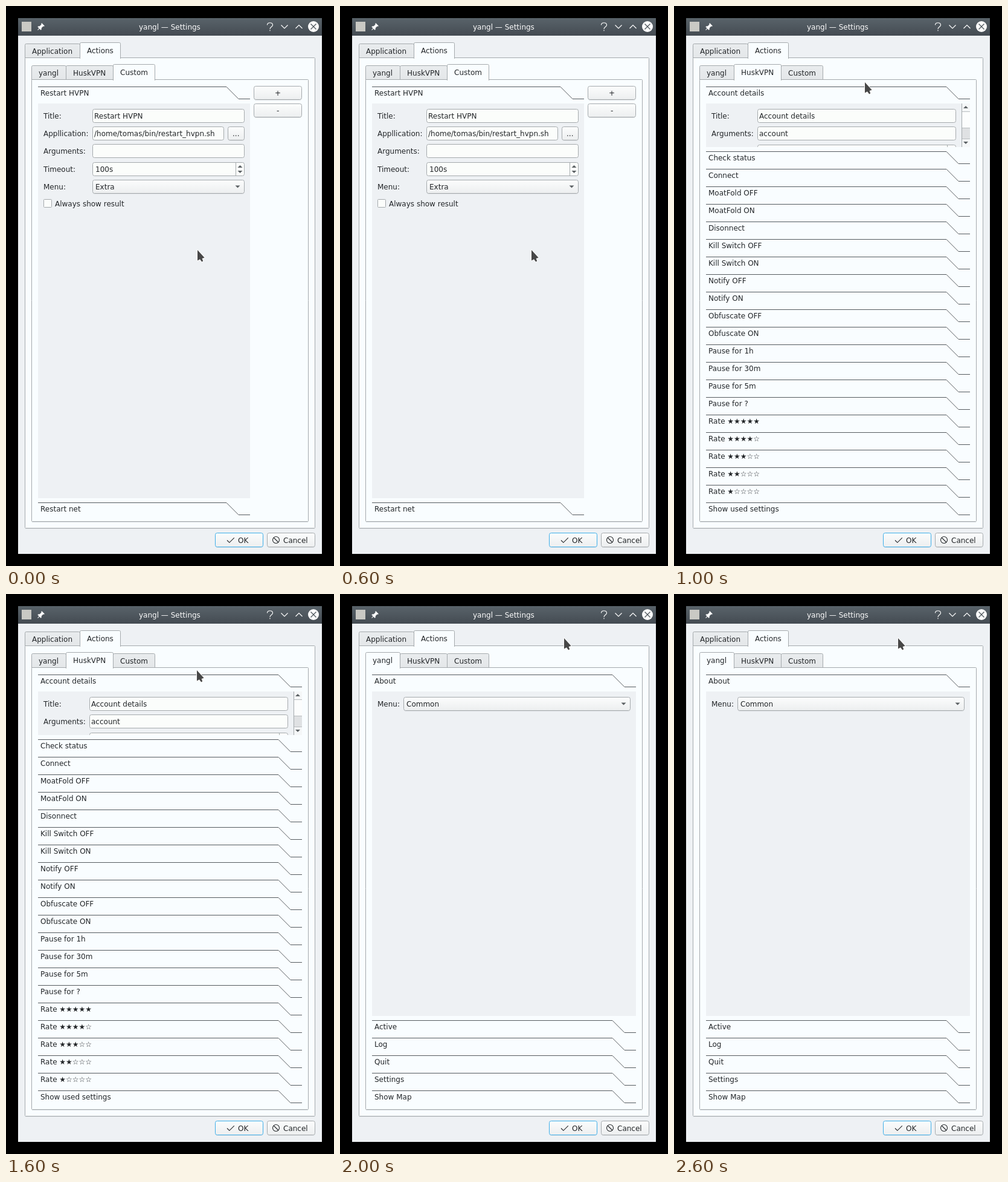
An HTML page with a canvas that plays this animation: 543 px wide and 925 px high, repeating every 3 s.

```html
<!DOCTYPE html>
<html lang="en">
<head>
<meta charset="utf-8">
<title>Settings</title>
<style>
  html, body { margin: 0; width: 100%; height: 100%; overflow: hidden; background: #000; }
  canvas { display: block; }
</style>
</head>
<body>
<canvas id="stage" width="543" height="925"></canvas>
<script>
const ctx = document.getElementById('stage').getContext('2d', { alpha: false });
const WINDOW = '#eef1f4', PANE = '#f9fdff', EDGE = '#a5aaad', INK = '#232629', FIELD = '#fbfdfb';
const TABS = [['yangl', 42, 57], ['HuskVPN', 99, 78], ['Custom', 177, 69]];

function rect(x, y, w, h, fill) {
  ctx.fillStyle = fill;
  ctx.fillRect(x, y, w, h);
}

function gradient(y, h, top, bottom) {
  const g = ctx.createLinearGradient(0, y, 0, y + h);
  g.addColorStop(0, top);
  g.addColorStop(1, bottom);
  return g;
}

function text(s, x, y, color = INK) {
  ctx.font = '12px "DejaVu Sans", sans-serif';
  ctx.fillStyle = color;
  ctx.fillText(s, x, y);
}

function stroke(path, color = INK, width = 1) {
  ctx.strokeStyle = color;
  ctx.lineWidth = width;
  ctx.stroke(new Path2D(path));
}

function fill(path, color) {
  ctx.fillStyle = color;
  ctx.fill(new Path2D(path));
}

function box(x, y, w, h, paint, radius = 3, edge = EDGE) {
  ctx.beginPath();
  ctx.roundRect(x + .5, y + .5, w - 1, h - 1, radius);
  ctx.fillStyle = paint;
  ctx.fill();
  ctx.strokeStyle = edge;
  ctx.lineWidth = 1;
  ctx.stroke();
}

function button(x, y, w, h, edge) {
  rect(x + 2, y + h, w - 4, 1, '#dfe2e5');
  box(x, y, w, h, gradient(y, h, '#fcfdfd', '#eceeef'), 3, edge);
}

function arrow(x, y, dir, size = 4) {
  fill(`M${x - size} ${y - dir * 2}h${size * 2}l${-size} ${dir * size}z`, '#5b6063');
}

function field(label, value, x, y, w) {
  text(label, 62, y + 16);
  box(x, y, w, 23, FIELD);
  text(value, x + 3, y + 16);
}

function combo(value, x, y, w) {
  text('Menu:', 62, y + 16);
  button(x, y, w, 23);
  text(value, x + 5, y + 16);
  arrow(x + w - 11.5, y + 11.5, 1);
}

function pane(x, y, w, h) {
  rect(x + 1, y + h, w - 2, 1, '#dde1e4');
  box(x, y, w, h, PANE, 1);
}

function tab(label, x, y, w, active) {
  const top = active ? y : y + 2, bottom = y + (active ? 27 : 26);
  const l = x + .5, r = x + w + .5, t = top + .5;
  const shape = `M${l} ${bottom}V${t + 2}q0-2 2-2H${r - 2}q2 0 2 2V${bottom}`;
  fill(shape, active ? PANE : gradient(top, 24, '#e9ecee', '#e4e7e9'));
  stroke(shape, EDGE);
  if (!active) rect(x, y + 25, w + 1, 1, EDGE);
  text(label, x + 12, y + (active ? 18 : 19));
}

function header(label, y, right = 490) {
  stroke(`M53 ${y + .5}H${right - 39}l20 20H${right}`, '#565b5f');
  text(label, 57, y + 15);
}

const headers = (labels, y) => labels.forEach((s, i) => header(s, y + i * 29));

function titleBar() {
  rect(20, 20, 503, 29, gradient(20, 29, '#59636a', '#444b52'));
  rect(26, 26, 16, 16, '#c9c9c4');
  fill('M59 28l5 5-1.5.8-1-.3-2.7 2.8-.2 2.7-1 .7-2.3-2.3-2.4 2.5-.7-.7 2.5-2.4-2.3-2.3.7-1 2.7-.2 2.8-2.7-.3-1z', '#fcfcfc');
  text('yangl — Settings', 220, 39, '#fcfcfc');
  stroke('M432.5 31.5c0-5 9-5 9 0 0 3-4.5 3.2-4.5 6.5M437 39.5v1.7', '#fcfcfc', 1.2);
  stroke('M455.5 31.5l5.5 5.5 5.5-5.5M479.5 37l5.5-5.5 5.5 5.5', '#fcfcfc', 1.2);
  fill('M500 34a9 9 0 1 0 18 0a9 9 0 1 0-18 0', '#fcfcfc');
  stroke('M504.5 29.5l9 9m0-9l-9 9', '#4b5359', 1.2);
}

function frameParts(activeTab) {
  rect(0, 0, 543, 925, '#000');
  rect(20, 49, 503, 856, WINDOW);
  titleBar();
  pane(31, 85, 481, 778);
  tab('Application', 31, 60, 91, false);
  tab('Actions', 122, 60, 67, true);
  pane(42, 121, 459, 731);
  TABS.forEach(([s, x, w], i) => i !== activeTab && tab(s, x, 96, w, false));
  tab(TABS[activeTab][0], TABS[activeTab][1], 96, TABS[activeTab][2], true);
  button(346, 870, 80, 24, '#3daee9');
  stroke('M366 882.5l3.8 3.8 8-8', INK, 1.1);
  text('OK', 384, 887);
  button(432, 870, 80, 24);
  stroke('M441.5 882a5.5 5.5 0 1 0 11 0a5.5 5.5 0 1 0-11 0M443 878l8 8', INK, 1.1);
  text('Cancel', 459, 887);
}

function customPage() {
  header('Restart HVPN', 133, 404);
  rect(53, 161, 351, 652, WINDOW);
  field('Title:', 'Restart HVPN', 143, 170, 252);
  field('Appllication:', '/home/tomas/bin/restart_hvpn.sh', 143, 199, 218);
  button(367, 199, 28, 23);
  text('...', 375, 215);
  field('Arguments:', '', 143, 228, 252);
  field('Timeout:', '', 143, 258, 252);
  text('100s', 148, 274);
  rect(380, 259, 1, 21, EDGE);
  arrow(387.5, 265, -1);
  arrow(387.5, 274, 1);
  combo('Extra', 143, 287, 252);
  box(62, 319, 14, 14, FIELD, 1);
  text('Always show result', 81, 331);
  header('Restart net', 820, 404);
  button(410, 132, 80, 23);
  text('+', 445, 148);
  button(410, 161, 80, 23);
  text('-', 448, 177);
}

function vpnPage() {
  header('Account details', 133);
  ctx.save();
  ctx.beginPath();
  ctx.rect(53, 161, 437, 72);
  ctx.clip();
  rect(53, 161, 437, 72, WINDOW);
  field('Title:', 'Account details', 138, 170, 329);
  field('Arguments:', 'account', 138, 199, 329);
  box(138, 229, 329, 23, FIELD);
  rect(452, 230, 1, 21, EDGE);
  rect(476, 161, 14, 72, '#f5f7f8');
  rect(477, 175, 13, 27, '#fcfdfd');
  rect(477, 202, 13, 17, '#dfe1e3');
  [174, 201, 219].forEach(y => rect(476, y, 14, 1, '#b9bdc0'));
  rect(476, 161, 1, 72, EDGE);
  arrow(483, 167, -1);
  arrow(483, 226, 1);
  ctx.restore();
  const rates = [5, 4, 3, 2, 1].map(n => 'Rate ' + '★'.repeat(n) + '☆'.repeat(5 - n));
  headers(['Check status', 'Connect', 'MoatFold OFF', 'MoatFold ON', 'Disonnect',
    'Kill Switch OFF', 'Kill Switch ON', 'Notify OFF', 'Notify ON', 'Obfuscate OFF', 'Obfuscate ON',
    'Pause for 1h', 'Pause for 30m', 'Pause for 5m', 'Pause for ?', ...rates, 'Show used settings'], 240);
}

function yanglPage() {
  header('About', 133);
  rect(53, 161, 437, 536, WINDOW);
  combo('Common', 105, 170, 376);
  headers(['Active', 'Log', 'Quit', 'Settings', 'Show Map'], 704);
}

function cursor(x, y) {
  const shape = `M${x} ${y}v17.5l4-2.2 3.2 4.2 2-1.3-1.6-4.2 4-1.2z`;
  ctx.lineJoin = 'round';
  stroke(shape, '#fcfcfc', 2);
  fill(shape, '#474747');
  ctx.lineJoin = 'miter';
}

const SCENES = [
  { tab: 2, page: customPage, pointer: [317, 403] },
  { tab: 1, page: vpnPage, pointer: [316, 126] },
  { tab: 0, page: yanglPage, pointer: [371, 73] },
];

function draw() {
  const scene = SCENES[Math.floor(performance.now() / 1000) % SCENES.length];
  frameParts(scene.tab);
  scene.page();
  cursor(...scene.pointer);
  requestAnimationFrame(draw);
}
draw();
</script>
</body>
</html>
```
